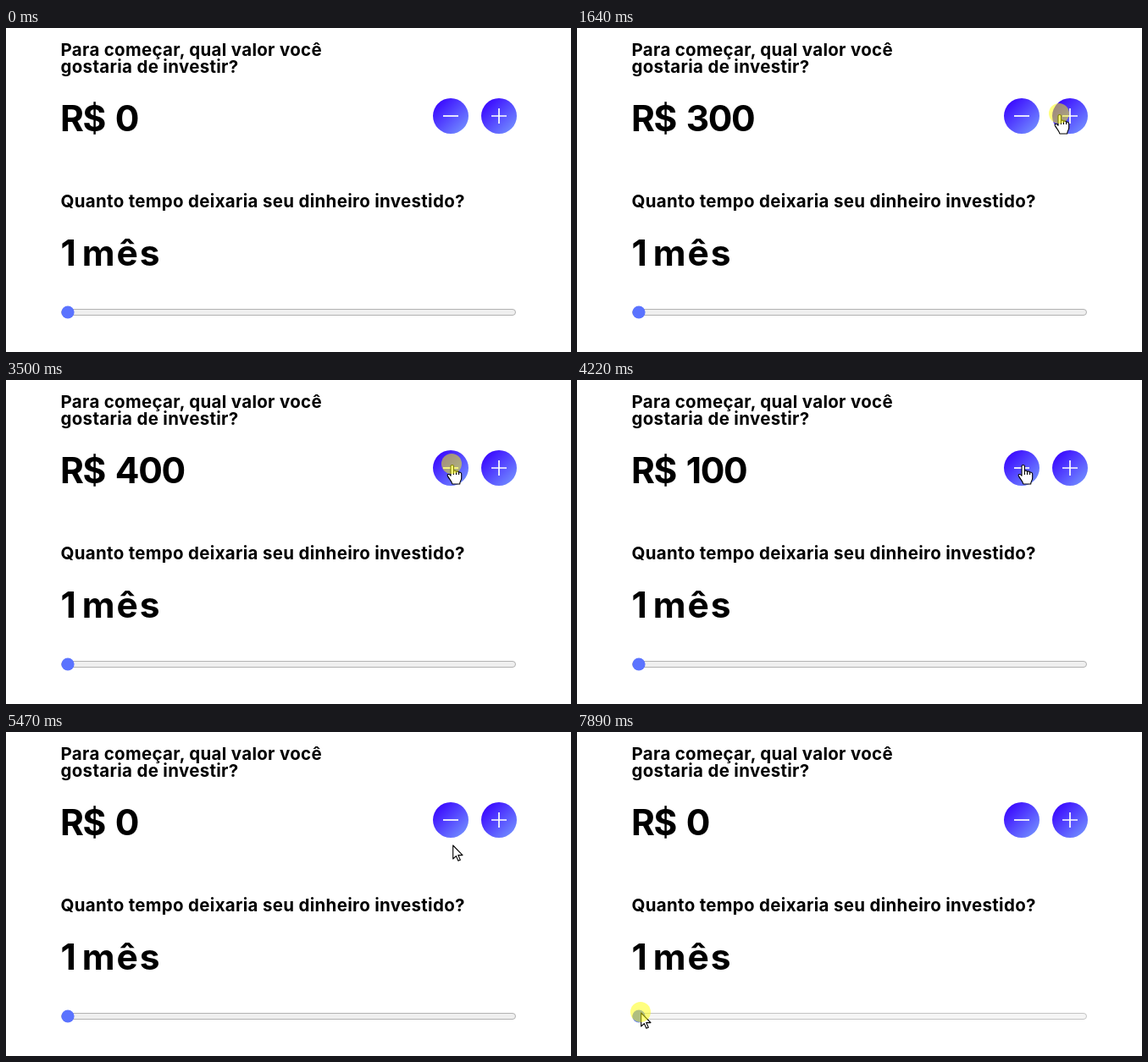
Write an HTML page that moves like this. It is 667 by 383 pixels and loops after 8000 ms.

```html
<!DOCTYPE html>
<html lang="pt-BR">
<head>
<meta charset="utf-8">
<title>Simulador de investimento</title>
<style>
  html, body { margin: 0; width: 100%; height: 100%; overflow: hidden; background: #fff; }
  svg { display: block; width: 100%; height: 100%; }
  text { font-family: Inter, "Open Sans", sans-serif; font-weight: 700; font-optical-sizing: none; fill: #000; }
  .label { font-size: 20.5px; letter-spacing: .3px; }
  .value { font-size: 42.5px; }
  .tight { letter-spacing: -1.4px; }
  .loose { letter-spacing: 2px; }
  .icon { stroke: #fff; stroke-width: 1.7; fill: none; }
  .cursor { fill: #fff; stroke: #000; stroke-width: 1.1; stroke-linejoin: round; }
</style>
</head>
<body>
<svg viewBox="0 0 667 383">
  <defs>
    <linearGradient id="blue" x1=".12" y1=".12" x2=".88" y2=".88">
      <stop offset="0" stop-color="#3a08ff"/>
      <stop offset="1" stop-color="#7089ff"/>
    </linearGradient>
  </defs>

  <text class="label" x="64.5" y="33">Para começar, qual valor você</text>
  <text class="label" x="64.5" y="53">gostaria de investir?</text>
  <text class="value tight" x="64" y="122">R$ <tspan id="amount" x="128.8">0</tspan></text>

  <g transform="translate(525 104)">
    <circle r="21" fill="url(#blue)"/>
    <path class="icon" d="M-9 0H9"/>
  </g>
  <g transform="translate(582 104)">
    <circle r="21" fill="url(#blue)"/>
    <path class="icon" d="M-9 0H9M0-9V9"/>
  </g>

  <text class="label" x="64.5" y="212">Quanto tempo deixaria seu dinheiro investido?</text>
  <text class="value" x="64.5" y="281.3">1 <tspan class="loose" x="89.7">mês</tspan></text>

  <rect id="track" x="65.5" y="332.5" width="536" height="7" rx="3.5"/>
  <circle id="thumb" cx="73" cy="336" r="7.6"/>

  <g id="pointer">
    <g transform="translate(.7 1)">
      <path id="arrow" class="cursor" d="M0 0V16L3.7 12.6 6.2 18.3 8.6 17.3 6.1 11.6H11.3Z"/>
      <path id="hand" class="cursor" d="M-1.7 2C-1.7-.1 1.7-.1 1.7 2V8C2 6.6 4.8 6.8 4.8 8.6 5.2 7.4 7.9 7.6 7.9 9.6 8.4 8.6 11 9 11 11.2V16C11 18.5 9 19.5 9 23H.2C-.2 20-3 17.5-5.3 13.6-6.4 11.4-3.6 10.4-1.7 13.2ZM-1.7 13.2V2M1.7 8V12M4.8 8.6V12M7.9 9.6V12"/>
    </g>
    <circle id="glow" r="12" fill="#ff0" fill-opacity=".5"/>
  </g>
</svg>
<script>
const LOOP = 8000, HOLD = 130, FADE = 140;
const el = id => document.getElementById(id);
const [amount, track, thumb, pointer, arrow, hand, glow] =
  ["amount", "track", "thumb", "pointer", "arrow", "hand", "glow"].map(el);

// Pointer stops: time, x, y
const stops = [
  [120, 626, 354], [480, 569, 101],
  [2560, 569, 101], [2760, 536, 101], [2900, 526, 99],
  [5250, 526, 99], [5470, 527, 133], [5680, 528, 157],
  [5780, 528, 157], [6050, 524, 112],
  [6960, 524, 112], [7540, 75, 331]
];
const plusClicks = [520, 920, 1250, 1600, 1950];
const minusClicks = [2950, 3380, 3660, 3950, 4290, 4550, 4810, 6110, 6630];
const sliderPress = 7890;
const presses = [...plusClicks, ...minusClicks, sliderPress];

const ease = k => k * k * (3 - 2 * k);
const done = (clicks, t) => clicks.filter(c => t >= c + HOLD).length;
const show = (node, on) => node.setAttribute("visibility", on ? "inherit" : "hidden");

function pointerAt(t) {
  const i = stops.findIndex(s => s[0] > t);
  if (i < 0) return stops[stops.length - 1].slice(1);
  if (i === 0) return stops[0].slice(1);
  const [t0, x0, y0] = stops[i - 1], [t1, x1, y1] = stops[i];
  const k = ease((t - t0) / (t1 - t0));
  return [x0 + (x1 - x0) * k, y0 + (y1 - y0) * k];
}

function glowAt(t) {
  const p = presses.filter(c => t >= c).pop();
  if (p === undefined) return 0;
  return Math.max(0, Math.min(1, 1 - (t - p - HOLD) / FADE));
}

function draw(t) {
  const [x, y] = pointerAt(t);
  const onButton = [525, 582].some(cx => Math.hypot(x - cx, y - 104) < 21);
  const onSlider = x < 602 && y > 328 && y < 344;

  amount.textContent = Math.max(0, done(plusClicks, t) - done(minusClicks, t)) * 100;

  pointer.setAttribute("transform", `translate(${x} ${y})`);
  pointer.setAttribute("visibility", t >= stops[0][0] ? "visible" : "hidden");
  show(hand, onButton);
  show(arrow, !onButton);
  glow.setAttribute("opacity", glowAt(t));

  const [fill, stroke, knob] =
    t >= sliderPress ? ["#f5f5f5", "#c4c4c4", "#5f7cff"] :
    onSlider ? ["#e5e5e5", "#9c9c9c", "#4a62ee"] :
    ["#efefef", "#b2b2b2", "#5b73ff"];
  track.setAttribute("fill", fill);
  track.setAttribute("stroke", stroke);
  thumb.setAttribute("fill", knob);
}

function frame() {
  draw(performance.now() % LOOP);
  requestAnimationFrame(frame);
}
frame();
</script>
</body>
</html>
```
